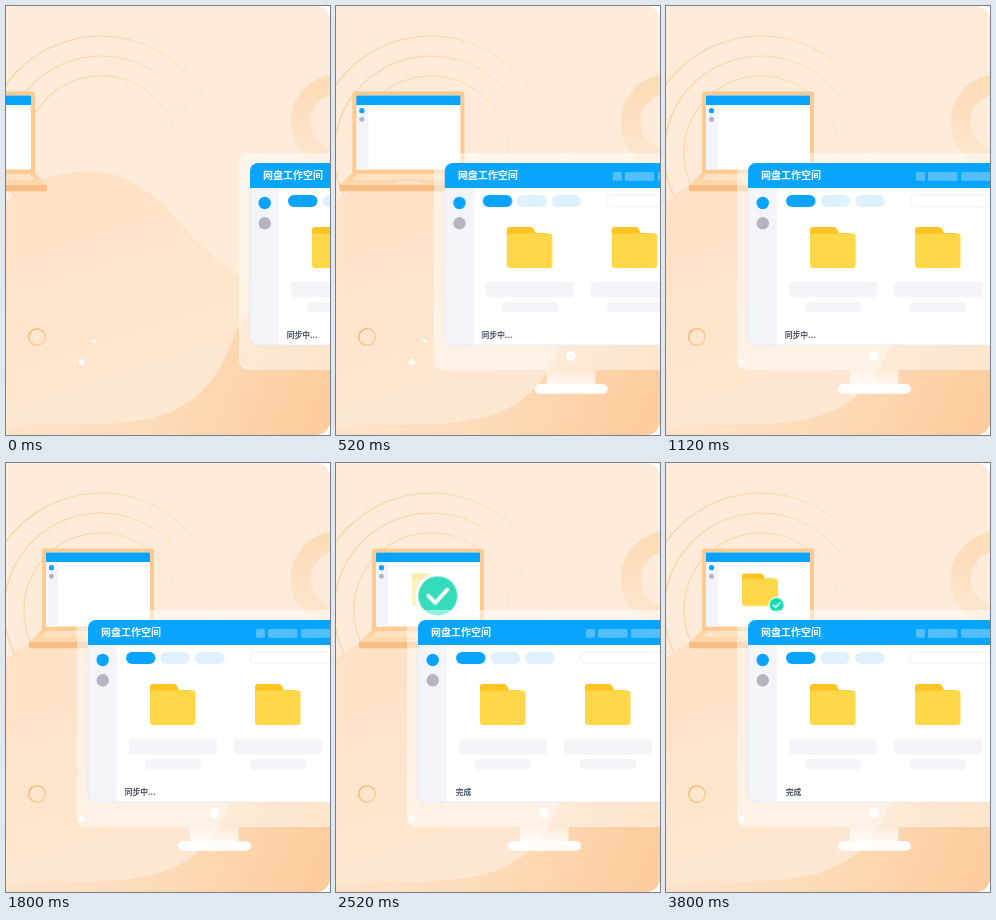
An HTML page that plays this animation: 324 px wide and 429 px high, repeating every 4 s.

```html
<!DOCTYPE html>
<html lang="zh">
<head>
<meta charset="utf-8">
<title>网盘工作空间</title>
<style>
html, body { margin: 0; width: 100%; height: 100%; overflow: hidden; background: #fff; }
svg { display: block; width: 100%; height: 100%; }
text { font-family: "Noto Sans CJK SC", "Noto Sans CJK", "Noto Sans", sans-serif; font-weight: 700; }
.laptop, .monitor, .badge, .pop, .spin, .check, .syncing, .done, .mint, .file {
  animation: 4s linear infinite both;
}
.laptop { --from: -119px; --rest: -.9px; animation-name: slide; }
.monitor { --from: 162px; --rest: 1.2px; animation-name: slide; }
.badge { animation-name: badge; }
.spin { animation-name: spin; }
.check { animation-name: check; }
.pop { animation-name: pop; }
.mint { animation-name: mint; }
.file { animation-name: file; }
.syncing { animation-name: syncing; }
.done { animation-name: done; }

@keyframes slide {
  0%, 5% { transform: translateX(var(--from)); animation-timing-function: cubic-bezier(.25, .6, .6, 1); }
  19% { transform: translateX(var(--rest)); animation-timing-function: ease-out; }
  30%, 100% { transform: none; }
}
@keyframes badge {
  0%, 44.99% { opacity: 0; transform: none; }
  45% { opacity: 1; transform: none; animation-timing-function: ease-out; }
  55.5%, 57.5% { transform: scale(1.5); animation-timing-function: ease-in-out; }
  72%, 94.99% { opacity: 1; transform: scale(.94); }
  95%, 100% { opacity: 0; transform: scale(.94); }
}
@keyframes spin {
  0%, 45% { transform: none; }
  66%, 100% { transform: rotate(180deg); }
}
@keyframes check {
  0%, 59% { opacity: 0; }
  65%, 100% { opacity: 1; }
}
@keyframes pop {
  0%, 45% { transform: translate(98px, 129px) scale(0); animation-timing-function: ease-out; }
  55.5%, 57.5% { transform: translate(98px, 129px) scale(3.12); animation-timing-function: ease-in-out; }
  72%, 100% { transform: translate(110.5px, 142px) scale(.88); }
}
@keyframes mint {
  0%, 57.5% { fill: #4bdcc2; }
  72%, 100% { fill: #10dcb0; }
}
@keyframes file {
  0%, 59% { opacity: 0; }
  70%, 100% { opacity: 1; }
}
@keyframes syncing {
  0%, 50.99% { opacity: 1; }
  51%, 100% { opacity: 0; }
}
@keyframes done {
  0%, 50.99% { opacity: 0; }
  51%, 100% { opacity: 1; }
}
</style>
</head>
<body>
<svg viewBox="0 0 324 429">
  <defs>
    <clipPath id="card"><path d="M0 0H310A14 14 0 0 1 324 14V415A14 14 0 0 1 310 429H0Z"/></clipPath>
    <clipPath id="screen"><rect x="82" y="157" width="252" height="182" rx="8"/></clipPath>
    <linearGradient id="arc" gradientUnits="userSpaceOnUse" x1="20" y1="60" x2="205" y2="110">
      <stop offset="0" stop-color="#fbd3a0"/>
      <stop offset=".45" stop-color="#fcd9ad"/>
      <stop offset="1" stop-color="#fcd9ad" stop-opacity="0"/>
    </linearGradient>
    <linearGradient id="hill" x1="0" y1="0" x2=".4" y2="1">
      <stop offset="0" stop-color="#fee1c5"/>
      <stop offset="1" stop-color="#fee8d3"/>
    </linearGradient>
    <linearGradient id="wave" x1="0" y1=".4" x2="1" y2=".6">
      <stop offset="0" stop-color="#fee6cf"/>
      <stop offset=".55" stop-color="#fedbb8"/>
      <stop offset="1" stop-color="#fdcd9f"/>
    </linearGradient>
    <linearGradient id="ring" x1="0" y1="0" x2="0" y2="1">
      <stop offset="0" stop-color="#fddcb8"/>
      <stop offset="1" stop-color="#fde6cf"/>
    </linearGradient>
    <linearGradient id="loop" x1="0" y1="0" x2="1" y2="1">
      <stop offset="0" stop-color="#f5b36b"/>
      <stop offset="1" stop-color="#fcd6a6"/>
    </linearGradient>
    <linearGradient id="deck" x1="0" y1="0" x2="0" y2="1">
      <stop offset="0" stop-color="#fdcf9b"/>
      <stop offset="1" stop-color="#fed9b0"/>
    </linearGradient>
    <linearGradient id="neck" x1="0" y1="0" x2="0" y2="1">
      <stop offset="0" stop-color="#fff" stop-opacity=".5"/>
      <stop offset="1" stop-color="#fff" stop-opacity=".8"/>
    </linearGradient>

    <g id="folder">
      <path fill="#fec423" d="M0 3a3 3 0 0 1 3-3H24q2 0 3 2l2 4H40V30H0Z"/>
      <rect y="6.5" width="45.5" height="34.5" rx="3" fill="#ffd748"/>
    </g>
    <path id="tick" d="M-3.8 0L-1 2.8 3.9-2.6" fill="none" stroke="#fff" stroke-width="1.6" stroke-linecap="round" stroke-linejoin="round"/>
    <g id="half">
      <path d="M-4.7-1.7A5 5 0 0 1 3.6-3.5" fill="none" stroke="#fff" stroke-width="1.3" stroke-linecap="round"/>
      <path d="M5.5-4.7L5.1-.9 1.9-2.7Z" fill="#fff"/>
    </g>
    <g id="bars" fill="#f4f5f9">
      <rect x="123" y="276" width="88" height="15.5" rx="3"/>
      <rect x="139" y="296" width="56" height="10.5" rx="4"/>
    </g>
    <g id="status">
      <g class="badge">
        <circle r="10" fill="#fff"/>
        <circle r="9" fill="#08a4ff"/>
        <g class="spin">
          <use href="#half"/>
          <use href="#half" transform="rotate(180)"/>
        </g>
        <g class="check">
          <circle r="9.6" fill="#fff"/>
          <circle r="8.5" fill="#10dcb0"/>
          <use href="#tick"/>
        </g>
      </g>
    </g>
  </defs>

  <g clip-path="url(#card)">
    <rect width="324" height="429" fill="#feebd9"/>
    <g fill="none" stroke="url(#arc)" stroke-width="1.2">
      <circle cx="95" cy="147" r="117"/>
      <circle cx="95" cy="147" r="97"/>
      <circle cx="95" cy="147" r="77"/>
    </g>
    <circle cx="54" cy="45" r="1" fill="#fff3e6"/>
    <circle cx="332" cy="116" r="37.5" fill="none" stroke="url(#ring)" stroke-width="20"/>
    <path fill="url(#hill)" d="M0 196C25 174 52 165 86 165.500C134 167 160 202 188 232C210 256 232 268 262 290L324 330V429H0Z"/>
    <path fill="url(#wave)" d="M0 421C45 416 80 422 130 415C182 407 206 382 222 345C235 312 246 290 290 280L324 276V429H0Z"/>
    <circle cx="31" cy="331" r="8.300" fill="none" stroke="url(#loop)" stroke-width="1.600"/>
    <circle cx="88.500" cy="335" r="1.800" fill="#fff"/>
    <circle cx="75.500" cy="356" r="3" fill="#fff"/>

    <g class="laptop">
      <path fill="url(#deck)" d="M36 167H148L160 179H23Z"/>
      <path fill="#fee1c0" d="M41 168H143L147 174H36Z"/>
      <rect x="80" y="175" width="24" height="3" rx="1" fill="#fee4c8"/>
      <path fill="#f9bd83" d="M23 179H160V183.500Q160 185.300 158 185.300H25Q23 185.300 23 183.500Z"/>
      <path fill="#fdcb92" d="M36 167V88.500a3 3 0 0 1 3-3H145a3 3 0 0 1 3 3V167Z"/>
      <rect x="40" y="89.500" width="104" height="74" rx="1" fill="#fff"/>
      <rect x="40" y="98" width="12" height="65.500" fill="#f3f5fa"/>
      <path fill="#08a4ff" d="M40 99V90.500a1 1 0 0 1 1-1H143a1 1 0 0 1 1 1V99Z"/>
      <circle cx="45.500" cy="104.700" r="2.600" fill="#08a4ff"/>
      <circle cx="45.500" cy="113.200" r="2.500" fill="#b4b5c0"/>
      <g class="file"><use href="#folder" transform="translate(76 110.500) scale(.79)"/></g>
      <g class="pop">
        <circle r="9.300" fill="#fff"/>
        <circle class="mint" r="8"/>
        <use href="#tick"/>
      </g>
    </g>

    <g class="monitor">
      <rect x="184" y="364" width="48.500" height="14" fill="url(#neck)"/>
      <rect x="172" y="378" width="73" height="9.800" rx="4.900" fill="#fff" fill-opacity=".95"/>
      <rect x="71.500" y="147.500" width="273" height="216" rx="8" fill="#fff" fill-opacity=".48" stroke="#fff" stroke-opacity=".35"/>
      <circle cx="209" cy="152" r="1.300" fill="#fff" fill-opacity=".7"/>
      <circle cx="208" cy="350" r="5" fill="#fff" fill-opacity=".9"/>
      <g clip-path="url(#screen)">
        <rect x="82" y="157" width="252" height="182" fill="#fff"/>
        <rect x="82" y="182" width="29" height="157" fill="#f3f5fa"/>
        <rect x="82" y="157" width="252" height="25" fill="#08a5ff"/>
      </g>
      <path d="M82 182V331a8 8 0 0 0 8 8H326a8 8 0 0 0 8-8V182" fill="none" stroke="#e3e5ec" stroke-width=".7"/>
      <text x="95" y="173.300" font-size="10" fill="#fff">网盘工作空间</text>
      <g fill="#fff" fill-opacity=".3">
        <rect x="250" y="166" width="9" height="8.700" rx="1.500"/>
        <rect x="262" y="166" width="29.500" height="8.700" rx="1.500"/>
        <rect x="295" y="166" width="32" height="8.700" rx="1.500"/>
      </g>
      <circle cx="96.700" cy="197" r="6.200" fill="#08a4ff"/>
      <circle cx="96.700" cy="217.300" r="6.200" fill="#b4b5c0"/>
      <rect x="120" y="189" width="29.500" height="12" rx="6" fill="#08a4ff"/>
      <rect x="154.500" y="189" width="29.500" height="12" rx="6" fill="#dff1ff"/>
      <rect x="189" y="189" width="29.500" height="12" rx="6" fill="#dff1ff"/>
      <rect x="244.500" y="188.800" width="84" height="12" rx="4" fill="#fff" stroke="#eff1f6"/>
      <use href="#folder" x="144" y="221"/>
      <use href="#folder" x="249" y="221"/>
      <use href="#bars"/>
      <use href="#bars" x="105"/>
      <use href="#status" x="187.200" y="261.500"/>
      <use href="#status" x="292.200" y="261.500"/>
      <text class="syncing" x="118.700" y="332.300" font-size="7.800" fill="#4a5162">同步中...</text>
      <text class="done" x="119.800" y="332.300" font-size="7.800" fill="#4a5162">完成</text>
    </g>
  </g>
</svg>
</body>
</html>
```
